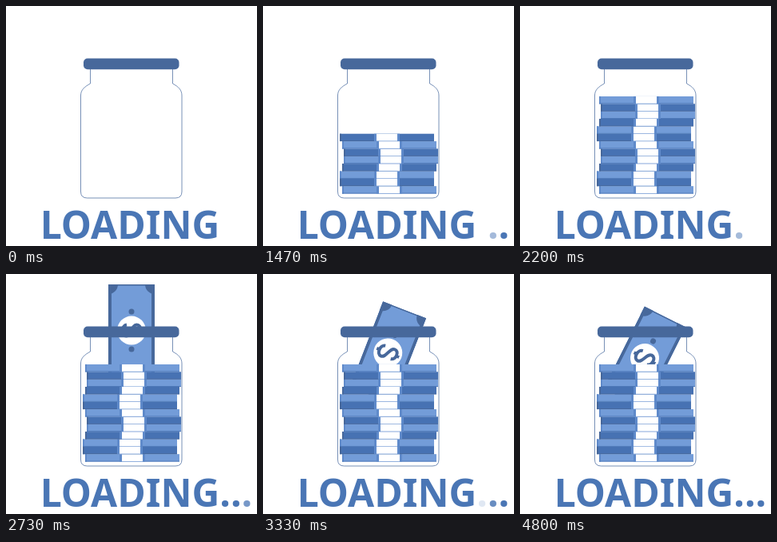
These frames come from a looping animation (314 by 300 pixels, 5.19 s). An HTML page:

```html
<!DOCTYPE html>
<html lang="en">
<head>
<meta charset="utf-8">
<title>Loading</title>
<style>
  html, body { margin: 0; width: 100%; height: 100%; overflow: hidden; background: #fff; }
  svg { display: block; width: 100vw; height: 100vh; }
  text { font: 700 48px "Noto Sans", "Open Sans", sans-serif; }
</style>
</head>
<body>
<svg viewBox="0 0 314 300">
  <defs>
    <clipPath id="note"><rect x="-29" y="-57.5" width="58" height="115"/></clipPath>
  </defs>
  <path fill="none" stroke="#4a6b9f" stroke-width=".75" d="M105.5 79V97C98 101 93.5 105 93.5 112V232Q93.5 240 101.5 240H212Q220 240 220 232V112C220 105 216 101 208.5 97V79"/>
  <g id="bill" clip-path="url(#note)">
    <rect x="-29" y="-57.5" width="58" height="115" fill="#739cd8"/>
    <g fill="#47689b">
      <path d="M-29-57.5h4v115h-4zM25-57.5h4v115h-4zM-29-57.5h58v1.5h-58z"/>
      <circle cx="-29" cy="-57.5" r="12"/>
      <circle cx="29" cy="-57.5" r="12"/>
      <circle cy="-23.5" r="3.5"/>
      <circle cy="23.5" r="3.5"/>
    </g>
    <circle r="18" fill="#fff"/>
    <path transform="rotate(90)" fill="none" stroke="#47689b" stroke-width="4" d="M6-6C5-13-7-13-7-6.5C-7 0 7 0 7 6.5C7 13-6 13-7 6M0-15v4M0 11v4"/>
  </g>
  <g id="stack"></g>
  <rect x="97" y="65.6" width="119.5" height="13.7" rx="5" fill="#47689b"/>
  <text x="42.7" y="290.5" fill="#4a76b5">LOADING<tspan class="dot">.</tspan><tspan class="dot">.</tspan><tspan class="dot">.</tspan></text>
</svg>
<script>
const LOOP = 5190, END = 4800, FRAME = 200 / 3, BUNDLES = 13;
const LIGHT = '#739cd8', MID = '#5f8aca', DARK = '#4772b3', EDGE = '#47689b';
const LEFTS = [99, 96, 96, 99, 101, 101];
const stack = document.getElementById('stack');
const bill = document.getElementById('bill');
const dots = [...document.querySelectorAll('.dot')];

const rect = (x, y, w, h, fill) =>
  `<rect x="${x}" y="${y}" width="${w}" height="${h}" fill="${fill}"/>`;

function bundle(i) {
  const x = LEFTS[i % 6], y = 225.15 - 9.35 * i, light = i % 2 === 0;
  return '<g>' +
    rect(x, y, 118, 9.35, light ? LIGHT : DARK) +
    rect(x, y, 2, 9.35, light ? MID : EDGE) +
    rect(x, y + 8.5, 118, 0.85, light ? DARK : EDGE) +
    rect(x + 43, y, 32, 9.35, MID) +
    rect(x + 46, y, 26, 9.35, '#fff') +
    rect(x + 46, y + 8.8, 26, 0.55, LIGHT) +
    '</g>';
}
stack.innerHTML = Array.from({ length: BUNDLES }, (_, i) => bundle(i)).join('');

const ramp = (t, from, span) => Math.min(1, Math.max(0, (t - from) / span));
const easeIn = u => u * u;
const easeOut = u => 1 - (1 - u) ** 2;

function draw(t) {
  [...stack.children].forEach((b, i) =>
    b.setAttribute('visibility', t >= 528 + 128 * i ? 'visible' : 'hidden'));

  // The note pops up, then tips over and sinks back.
  const rise = easeOut(ramp(t, 2530, 270));
  const tip = easeIn(ramp(t, 2800, 270));
  const sink = easeOut(ramp(t, 3070, 530));
  const y = 172 - 108 * rise + 15 * tip + 26 * sink;
  const angle = 5.5 * tip + 21.1 * sink;
  bill.setAttribute('transform', `translate(${157 - sink} ${y}) rotate(${angle})`);
  bill.setAttribute('visibility', t > 2530 ? 'visible' : 'hidden');

  const phase = t % 2000;
  dots.forEach((d, i) => d.setAttribute('fill-opacity',
    ramp(phase, 67 + 233 * i, 267) - ramp(phase, 1000 + 267 * i, 400)));
}

function tick() {
  const t = Math.min(END, performance.now() % LOOP);
  draw(Math.floor((t + 5) / FRAME) * FRAME);
  requestAnimationFrame(tick);
}
tick();
</script>
</body>
</html>
```
